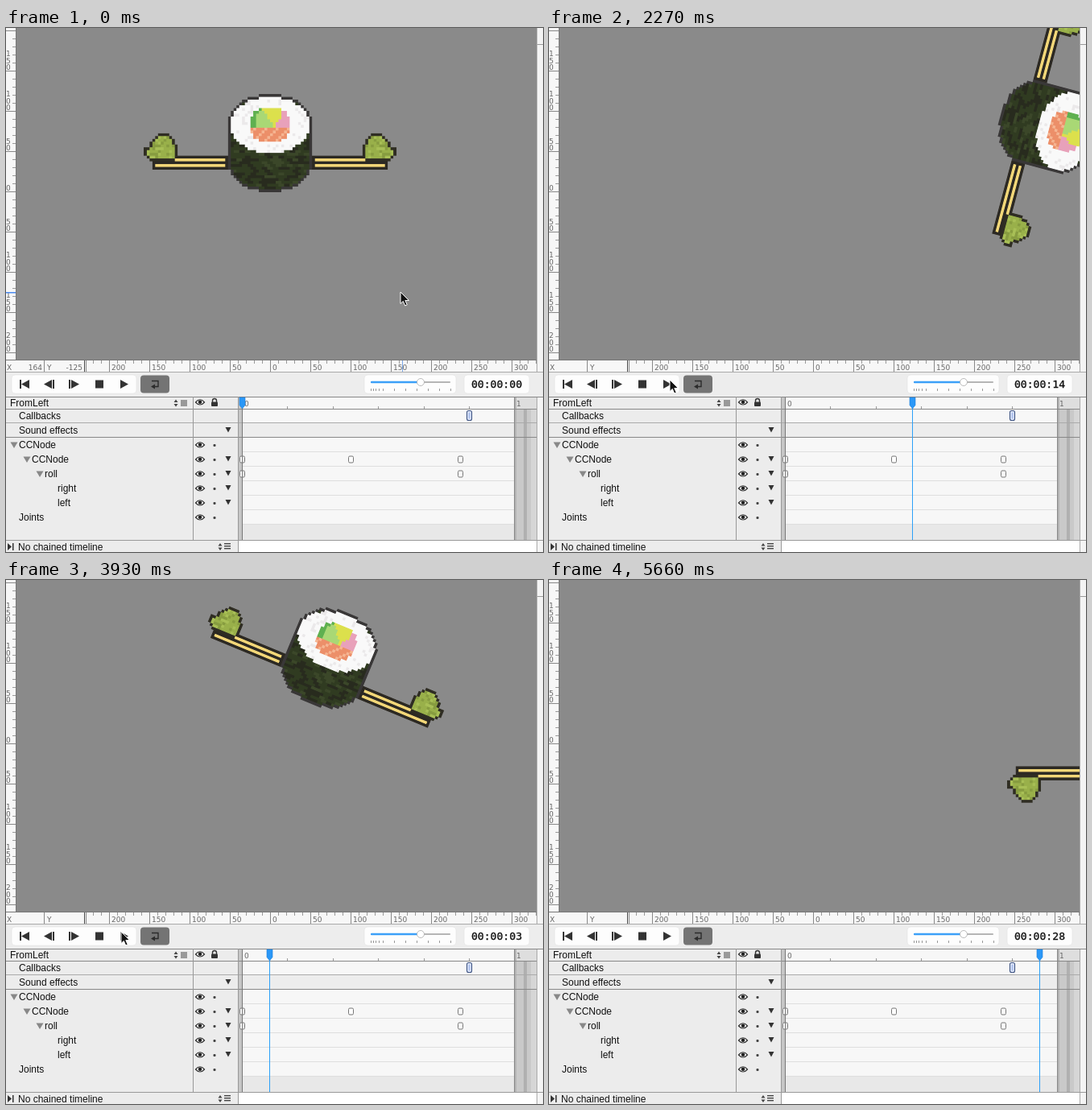
Animation, 667 px wide and 651 px high, one loop 6280 ms. Source, as an HTML page with a canvas:

```html
<!DOCTYPE html>
<html lang="en">
<head>
<meta charset="utf-8">
<title>Sushi timeline</title>
<style>
html, body { margin: 0; width: 100%; height: 100%; overflow: hidden; background: #f4f4f4; }
canvas, svg { position: absolute; left: 0; top: 0; display: block; }
text { font: 12px "Liberation Sans", Arial, sans-serif; fill: #111; white-space: pre; }
.rule { font: 9px "DejaVu Sans", sans-serif; fill: #666; }
.code { font: 13.1px "DejaVu Sans Mono", monospace; stroke: #111; stroke-width: .3px; }
</style>
</head>
<body>
<canvas id="stage" width="659" height="412"></canvas>
<svg id="ui" width="667" height="651" viewBox="0 0 667 651"></svg>
<script>
const ui = document.getElementById('ui');
const ctx = document.getElementById('stage').getContext('2d');

function add(tag, attrs, parent = ui) {
  const el = document.createElementNS('http://www.w3.org/2000/svg', tag);
  for (const k in attrs) el.setAttribute(k, attrs[k]);
  parent.appendChild(el);
  return el;
}
const box = (x, y, width, height, fill, rx = 0, more = {}) =>
  add('rect', { x, y, width, height, fill, rx, ...more });
const path = (d, fill = '#333', more = {}) => add('path', { d, fill, ...more });
const disc = (cx, cy, r, fill, more = {}) => add('circle', { cx, cy, r, fill, ...more });
function label(x, y, str, cls = '', anchor = 'start') {
  const el = add('text', { x, y, class: cls, 'text-anchor': anchor });
  el.textContent = str;
  return el;
}

// ---- rulers ----
function drawRulers() {
  box(0, 0, 12, 412, '#f7f7f7');
  box(12, 0, 1, 412, '#777');
  for (let y = 3; y < 412; y += 10) {
    const major = (y - 3) % 50 === 0;
    box(major ? 0 : 8, y, major ? 12 : 4, 1, major ? '#888' : '#999');
    if (!major || y < 50) continue;
    const digits = String(Math.abs(y - 203));
    [...digits].forEach((d, i) => label(0, y - 1 - (digits.length - 1 - i) * 8.3, d, 'rule'));
  }
  box(659, 0, 8, 651, '#f4f4f4');
  box(659, 0, 1, 651, '#aaa');
  box(660, 20, 7, 1, '#999');

  box(0, 412, 659, 16, '#f7f7f7');
  box(0, 412, 659, 1, '#777');
  box(0, 427, 667, 1, '#aaa');
  for (let x = 108; x < 659; x += 10) {
    const major = (x - 128) % 50 === 0;
    box(x, 413, 1, major ? 14 : 4, major ? '#888' : '#999');
    if (major) label(x + 3, 425, Math.abs(x - 328), 'rule');
  }
  box(47, 413, 1, 14, '#888');
  box(97, 413, 1, 14, '#444');
  box(99, 413, 1, 14, '#888');
  label(1, 425, 'X', 'rule');
  label(51, 425, 'Y', 'rule');
}

// ---- playback controls ----
function drawToolbar() {
  box(0, 428, 667, 30, '#ededed');
  const panel = { stroke: '#ddd', 'stroke-width': .5 };
  box(7, 431, 155, 23, '#fdfdfd', 4, panel);
  box(167, 431.5, 36, 22, '#747474', 4);
  box(445, 431, 114, 23, '#fdfdfd', 4, panel);
  box(569, 431, 81, 23, '#fdfdfd', 4, panel);
  path('M17 437h2v11h-2zM29 437v11l-10-5.5z');
  path('M57 437v11l-10-5.5zM58 437h2v11h-2z');
  path('M78 437h2v11h-2zM81 437v11l10-5.5z');
  box(111, 437.5, 10, 10, '#333');
  path('M142 437v11l10-5.5z');
  path('M181 438.5h8v7h-5', 'none', { stroke: '#2b2b2b', 'stroke-width': 1.4 });
  path('M185 442.5v6l-5-3z', '#2b2b2b');
  box(453, 439, 99, 2, '#b5b5b5', 1);
  box(453, 438.7, 62, 2.6, '#3ba0f8', 1);
  disc(515, 440, 4.5, '#fff', { stroke: '#aaa', 'stroke-width': .8 });
  for (const x of [453, 456, 459, 463, 468, 482, 496, 510, 524, 538, 552]) box(x, 448, 1, 3, '#999');
}

// ---- timeline table ----
const eye = y => {
  path(`M235.5 ${y}q5.5 -6.5 11 0q-5.5 6 -11 0z`, '#fff', { stroke: '#333', 'stroke-width': 1.2 });
  disc(241, y - .3, 2.3, '#222');
};
const twin = (x, y) => path(`M${x - 2.5} ${y - 1}h5l-2.5 -3.5zM${x - 2.5} ${y + 1}h5l-2.5 3.5z`, '#444');
const drop = y => path(`M272.5 ${y - 3}h7l-3.5 6.5z`);
const fold = (x, y) => path(`M${x - 4.5} ${y - 3.5}h9l-4.5 7.5z`, '#888');
const key = (x, y) => box(x - 3, y - 4, 6, 8, '#fcfcfc', 1.5, { stroke: '#777', 'stroke-width': 1 });

function drawTable() {
  box(0, 458, 289, 193, '#ececec');
  box(289, 459, 342, 157, '#f7f7f7');
  box(289, 491, 342, 17, '#ededed');
  box(289, 616, 342, 20, '#e8e8e8');
  box(289, 637, 370, 14, '#fff');
  [[631, 3, '#b4b4b4'], [634, 9, '#c9c9c9'], [643, 4, '#b0b0b0'], [647, 5, '#c9c9c9'], [652, 7, '#d6d6d6']]
    .forEach(([x, w, c]) => box(x, 459, w, 177, c));
  box(634, 459, 25, 14, '#dedede');
  for (let y = 526; y <= 616; y += 18) box(289, y, 342, 1, '#dedede');
  box(289, 459, 4, 177, '#c6c6c6');
  box(0, 458, 667, 1, '#888');
  box(0, 473, 659, 1, '#888');
  box(0, 490, 659, 1, '#aaa');
  box(0, 508, 659, 1, '#888');
  box(0, 636, 667, 1, '#999');
  box(232, 458, 1, 178, '#999');
  box(288, 458, 1, 193, '#999');
  box(631, 459, 1, 177, '#888');
  for (let i = 1; i < 6; i++) box(293 + Math.round(i * 56.4), 470, 1, 3, '#999');
  label(296, 470, '0', 'rule');
  label(634, 470, '1', 'rule');

  label(5, 470, 'FromLeft');
  twin(211, 466);
  box(217, 462, 8, 8, '#999');
  eye(465);
  path('M256.5 465v-2a2.5 2.5 0 0 1 5 0v2', 'none', { stroke: '#333', 'stroke-width': 1.4 });
  box(255, 464.5, 8, 5.5, '#333', 1);

  const rows = [['Callbacks', 16, 481], ['Sound effects', 16, 499], ['CCNode', 16, 517], ['CCNode', 32, 535],
    ['roll', 48, 553], ['right', 64, 571], ['left', 64, 589], ['Joints', 16, 607]];
  rows.forEach(([name, x, y], i) => {
    label(x, y + 5, name);
    if (i > 1) {
      eye(y + 1);
      box(257.5, y, 3, 3, '#444', 1);
    }
    if (i === 1 || i > 2 && i < 7) drop(y);
    if (i > 1 && i < 5) fold(x - 6, y + 1);
  });
  box(572.5, 475.5, 6, 12, '#dfe7fa', 2, { stroke: '#3d5382', 'stroke-width': 1.1 });
  box(574.5, 477.5, 2, 8, '#a9bdeb', 1);
  for (const x of [293.5, 428.5, 564.5]) key(x, 536);
  key(293.5, 554);
  key(564.5, 554);

  label(15, 649, 'No chained timeline');
  path('M2 640v9l5-4.5zM8 640h1.5v9h-1.5z');
  twin(266, 644.5);
  for (const y of [640, 643, 646]) box(271, y, 8, 1.4, '#444');
}

// ---- pixel art, built on a 90 x 35 grid ----
const COLS = 90, ROWS = 35, CELL = 3.48;
const hash = (a, b) => {
  const s = Math.sin(a * 127.1 + b * 311.7) * 43758.5453;
  return s - Math.floor(s);
};
const blob = [[5, 8], [4, 9], [3, 10], [2, 10], [2, 11], [0, 11], [0, 11], [0, 11], [1, 11], [2, 11]];
const inBlob = (c, r) => {
  const span = blob[r - 14];
  return !!span && c >= span[0] && c <= span[1];
};
const inRoll = (c, r) => {
  const x = (c - 44.5) / 15;
  const y = r < 11 ? (r - 10.5) / 11 : r < 24 ? 0 : (r - 23.5) / 11;
  return r >= 0 && r < ROWS && x * x + y * y <= 1;
};
const isEdge = (test, c, r) =>
  !(test(c - 1, r) && test(c + 1, r) && test(c, r - 1) && test(c, r + 1));

function fillingColor(x, y) {
  const d = Math.pow(Math.abs(x / 7.2), 2.4) + Math.pow(Math.abs(y / 6.2), 2.4);
  if (d > 1) return null;
  if (y > 1) return (x + y + 20) % 4 < 1 ? '#f5b592' : '#ec8f69';
  const left = -3 + (y + 6) * .64, right = 4.5 - Math.max(0, y + 4) * .6;
  if (x > left && x < right) return '#dce04c';
  if (x > 1) return '#e8a1ba';
  return x < -4.6 || d > .72 ? '#5fb050' : '#a9d875';
}

function rollColor(c, r) {
  if (isEdge(inRoll, c, r)) return '#393737';
  const x = c - 44.5, y = r - 10.5, n = hash(c, r);
  if (x * x / 196 + y * y / 104 <= 1) return fillingColor(x, y) || (n < .16 ? '#ebe9ea' : '#f9f9f9');
  const streak = hash((c + (r & 1)) >> 1, r);
  return streak < .3 ? '#282b1e' : streak > .82 ? '#3b4729' : '#303b21';
}

function armColor(c, r) {
  if (r >= 22 && r <= 26 && c >= (r < 24 ? 11 : 3)) {
    if (r === 23 && c < 29 || r === 25 && c > 3 && c < 29) return '#f3d778';
    return '#2c2923';
  }
  if (!inBlob(c, r)) return null;
  if (isEdge(inBlob, c, r)) return '#2f2d23';
  const n = hash(c + 7, r);
  return n < .25 ? '#879c40' : n > .75 ? '#a8bf56' : '#99b04a';
}

const art = document.createElement('canvas');
art.width = COLS * 4;
art.height = ROWS * 4;
function drawArt() {
  const g = art.getContext('2d');
  for (let r = 0; r < ROWS; r++) for (let c = 0; c < COLS; c++) {
    const color = c < 30 ? armColor(c, r) : c > 59 ? armColor(COLS - 1 - c, r) : inRoll(c, r) && rollColor(c, r);
    if (!color) continue;
    g.fillStyle = color;
    g.fillRect(c * 4, r * 4, 4, 4);
  }
}

// The roll turns about a point 62 px below its centre; the node hops: ease out up, ease in down.
function drawStage(frame) {
  const n = Math.min(frame, 24), turn = n * Math.PI / 24, arm = 62;
  const hop = n < 12 ? -101 * Math.sqrt(n / 12) : -101 + 98.5 * (n / 12 - 1) ** 2;
  ctx.setTransform(1, 0, 0, 1, 0, 0);
  ctx.fillStyle = '#8a8a8a';
  ctx.fillRect(0, 0, 659, 412);
  ctx.translate(328 + 16.58 * n + arm * Math.sin(turn), 143 + hop + arm * (1 - Math.cos(turn)));
  ctx.rotate(turn);
  ctx.imageSmoothingQuality = 'high';
  ctx.drawImage(art, -COLS * CELL / 2, -ROWS * CELL / 2, COLS * CELL, ROWS * CELL);
}

// ---- build ----
const ring = disc(0, 440, 0, 'rgba(0,0,0,.06)');
drawRulers();
drawToolbar();
drawTable();
drawArt();
const posX = label(45, 425, '', 'rule', 'end');
const posY = label(95, 425, '', 'rule', 'end');
const markX = box(0, 413, 1, 14, '#7aa7e8');
const markY = box(0, 328, 12, 1.5, '#4a8af0');
const clock = label(609.5, 447, '', 'code', 'middle');
const line = box(0, 470, 1, 166, '#2ba0f8');
box(293, 459, 1, 177, '#777');
const head = path('M-3.5 459h7v9.5l-3.5 4.5l-3.5 -4.5z', '#2b98f7', { stroke: '#1c7fd8', 'stroke-width': .6 });
const dot = disc(0, 440, 0, 'rgb(255,66,48)');
const pointer = path('M0 0v14.5l3.3-3.1l2.4 5.6l2.5-1.1l-2.4-5.4h4.6z', '#111', { stroke: '#fff', 'stroke-width': 1 });

// ---- timing ----
const LOOP = 6280, PLAY = 1800;
const steps = [0, 230, 380, 500, 620, 740, 850, 970, 1090, 1210, 1320, 1440, 1800, 1910, 2030, 2150, 2270, 2390,
  2510, 2630, 2750, 2860, 2980, 3100, 3210, 3330, 3450, 3570, 3690, 3810, 3930, 4040, 4190, 4340, 4460, 4580,
  4700, 4820, 4940, 5060, 5180, 5300, 5420, 5540, 5660];
const route = [[0, 490, 328], [230, 489.5, 328], [380, 478, 333], [620, 390, 370], [970, 238, 432], [1210, 165, 438],
  [1440, 150, 437], [3810, 150, 437], [3930, 143, 437], [4040, 126, 437], [4190, 117, 437], [4340, 115, 437],
  [5060, 115, 437], [5300, 135, 490], [5660, 180, 660]];
const clicks = [[151, 1440, 1800, 1910, 52], [117, 4820, 4940, 5060, 50]];

function cursorAt(t) {
  const i = Math.max(1, route.findIndex(p => p[0] >= t));
  const [t0, x0, y0] = route[i - 1], [t1, x1, y1] = route[i];
  const k = (t - t0) / (t1 - t0);
  return [x0 + (x1 - x0) * k, y0 + (y1 - y0) * k];
}

function showClick(t) {
  let r = 0, alpha = 0, wave = 0;
  for (const [x, press, hold, fade, size] of clicks) {
    if (t !== press && t !== hold && t !== fade) continue;
    r = t === press ? 40 : 21;
    alpha = t === press ? .25 : t === hold ? .6 : .15;
    wave = t === hold ? size : 0;
    dot.setAttribute('cx', x);
    ring.setAttribute('cx', x);
  }
  dot.setAttribute('r', r);
  dot.setAttribute('opacity', alpha);
  ring.setAttribute('r', wave);
}

function show(t) {
  const frame = t < PLAY ? 0 : Math.min(88, Math.floor((t - PLAY) * .0298)) % 30;
  drawStage(frame);
  const x = Math.floor(293.2 + frame * 11.28);
  line.setAttribute('x', x);
  head.setAttribute('transform', `translate(${x + .5} 0)`);
  clock.textContent = '00:00:' + String(frame).padStart(2, '0');

  const [cx, cy] = cursorAt(t), over = cy < 412;
  pointer.setAttribute('transform', `translate(${cx} ${cy})`);
  posX.textContent = over ? Math.round(cx - 326) : '';
  posY.textContent = over ? Math.round(203 - cy) : '';
  markX.setAttribute('x', Math.round(cx) + 2);
  markY.setAttribute('y', Math.round(cy));
  for (const m of [markX, markY]) m.setAttribute('visibility', over ? 'visible' : 'hidden');
  showClick(t);
}

const start = performance.now();
let last = -1;
function tick() {
  const t = Math.max(0, performance.now() - start) % LOOP;
  const now = steps.filter(s => s <= t).pop();
  if (now !== last) show(last = now);
  requestAnimationFrame(tick);
}
tick();
</script>
</body>
</html>
```
